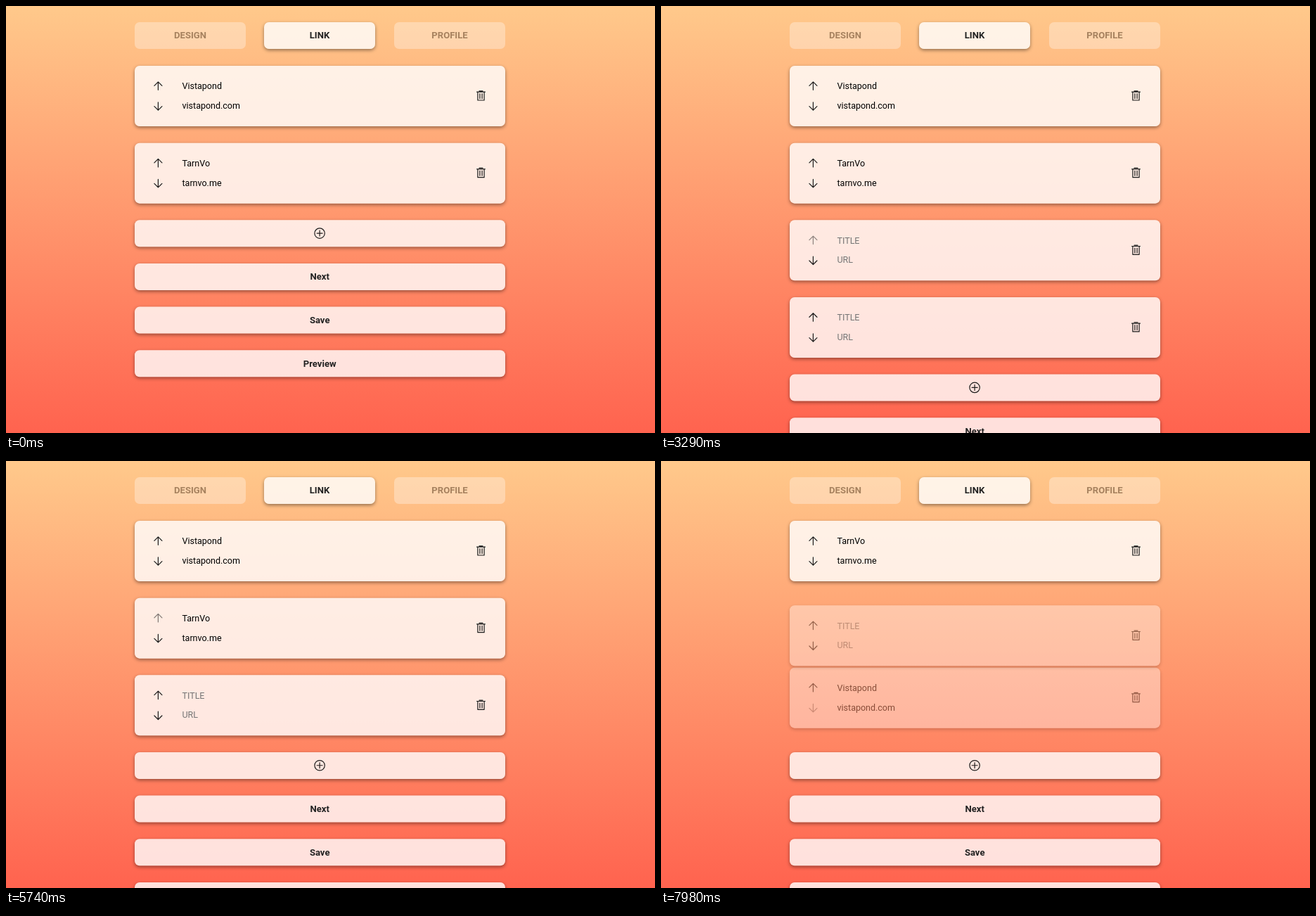
Write an HTML page that moves like this. It is 923 px wide and 607 px high and loops after 8000 ms.

```html
<!DOCTYPE html>
<html lang="en">
<head>
<meta charset="utf-8">
<title>Link editor</title>
<style>
html, body { margin: 0; width: 100%; height: 100%; overflow: hidden; }
#stage {
  position: relative; width: 923px; height: 607px; overflow: hidden;
  background: linear-gradient(#ffc98b, #ff634f);
}
.box {
  position: absolute; left: 183.2px; top: 0; width: 526.4px; height: 37.6px;
  border-radius: 7px; background: rgba(255, 255, 255, .8);
  box-shadow: 0 2px 5px rgba(0, 0, 0, .42);
}
.box svg { position: absolute; left: 0; top: 0; width: 100%; height: 100%; overflow: visible; }
.card { height: 85.6px; }
.tab { width: 158px; }
.idle { opacity: .4; box-shadow: none; }
text { font: 12.5px Roboto, "Open Sans", sans-serif; }
.hint { fill: #757575; }
.label { font-weight: 700; font-size: 13.1px; text-anchor: middle; fill: #222; }
.icon { fill: none; stroke: #1c1c1c; stroke-width: 1.2; stroke-linecap: round; stroke-linejoin: round; }
</style>
</head>
<body>
<div id="stage"></div>
<script>
const LOOP = 8000, TOP = 85, PITCH = 109.65, STEP = 61.65;
const stage = document.getElementById('stage');

const icon = (name, d) => `<path class="icon" data-icon="${name}" d="${d}"/>`;
const UP = icon('up', 'M33.4 34.3V22.9M27.9 28.3L33.4 22.8L38.9 28.3');
const DOWN = icon('down', 'M33.4 51.8V63.2M27.9 57.7L33.4 63.2L38.9 57.7');
const TRASH = icon('trash',
  'M486.6 37.2H498.4M490 35.8H495M487.9 37.4V49H497.1V37.4M490.9 39.7V46.6M494.1 39.7V46.6');
const PLUS = icon('plus',
  'M255.9 18.8a7.2 7.2 0 1 0 14.4 0a7.2 7.2 0 1 0 -14.4 0M263.1 14.8V22.8M259.1 18.8H267.1');

function box(kind, content) {
  const el = document.createElement('div');
  el.className = 'box ' + kind;
  el.innerHTML = `<svg>${content}</svg>`;
  stage.append(el);
  return el;
}

const label = (text, x) => `<text class="label" x="${x}" y="23.4">${text}</text>`;

function card(title, url, hint = '') {
  return box('card', UP + DOWN + TRASH +
    `<text class="${hint}" x="67.5" y="33.3">${title}</text>` +
    `<text class="${hint}" x="67.5" y="61">${url}</text>`);
}

function place(el, y, opacity = 1) {
  el.style.transform = `translateY(${y}px)`;
  el.style.opacity = opacity;
  el.style.visibility = opacity > 0.001 ? 'visible' : 'hidden';
}

function dim(el, name, amount) {
  el.querySelector(`[data-icon=${name}]`).style.opacity = 1 - 0.52 * amount;
}

['DESIGN', 'LINK', 'PROFILE'].forEach((name, i) => {
  const tab = box(i === 1 ? 'tab' : 'tab idle', label(name, 79));
  tab.style.left = 183.2 + i * 184.2 + 'px';
  tab.style.top = '23.4px';
});

const first = card('Vistapond', 'vistapond.com');
const second = card('TarnVo', 'tarnvo.me');
const third = card('TITLE', 'URL', 'hint');
const fourth = card('TITLE', 'URL', 'hint');
third.style.zIndex = 1;
const plus = box('', PLUS);
const buttons = [plus, ...['Next', 'Save', 'Preview'].map(name => box('', label(name, 263.2)))];
buttons.forEach(b => b.style.zIndex = 2);

const clamp = v => Math.max(0, Math.min(1, v));

// Critically damped spring from 0 to 1.
function spring(ms) {
  const x = Math.max(0, ms) * 0.01304;
  return 1 - (1 + x) * Math.exp(-x);
}

const ease = p => 1 - Math.pow(1 - clamp(p), 2.2);
const hover = (t, on, off, ms = 320) => ease((t - on) / ms) * (1 - ease((t - off) / ms));

// Swapped cards vanish quickly, then come back while they travel.
const blink = ms => 1 - clamp(ms / 140) + spring(ms - 230);

function render(t) {
  const addThird = spring(t - 630), addFourth = spring(t - 2153), remove = spring(t - 4392);
  const swapA = spring(t - 6265), swapB = spring(t - 7680);
  const fadeA = blink(t - 6215), fadeB = blink(t - 7630);
  const row = n => TOP + n * PITCH;

  place(first, row(swapA + swapB), fadeA * fadeB);
  place(second, row(1 - swapA), fadeA);
  place(third, row(2), addThird * (1 - remove));
  place(fourth, row(3 - remove - swapB), addFourth * fadeB);
  buttons.forEach((b, i) => place(b, row(2 + addThird + addFourth - remove) + i * STEP));

  const overPlus = hover(t, 50, 760, 500) + hover(t, 1180, 2240, 500);
  dim(plus, 'plus', overPlus);
  plus.style.boxShadow = `0 2px ${5 + overPlus}px rgba(0,0,0,${0.42 + 0.33 * overPlus})`;

  dim(third, 'up', hover(t, 2960, 3400, 420));
  dim(third, 'trash', hover(t, 3950, LOOP));
  dim(fourth, 'trash', hover(t, 4680, 5430));
  dim(second, 'up', hover(t, 5560, 6700));
  dim(first, 'up', hover(t, 6500, 7180));
  dim(first, 'down', hover(t, 7220, LOOP));
}

const start = performance.now();
function frame() {
  render((performance.now() - start) % LOOP);
  requestAnimationFrame(frame);
}
frame();
</script>
</body>
</html>
```
